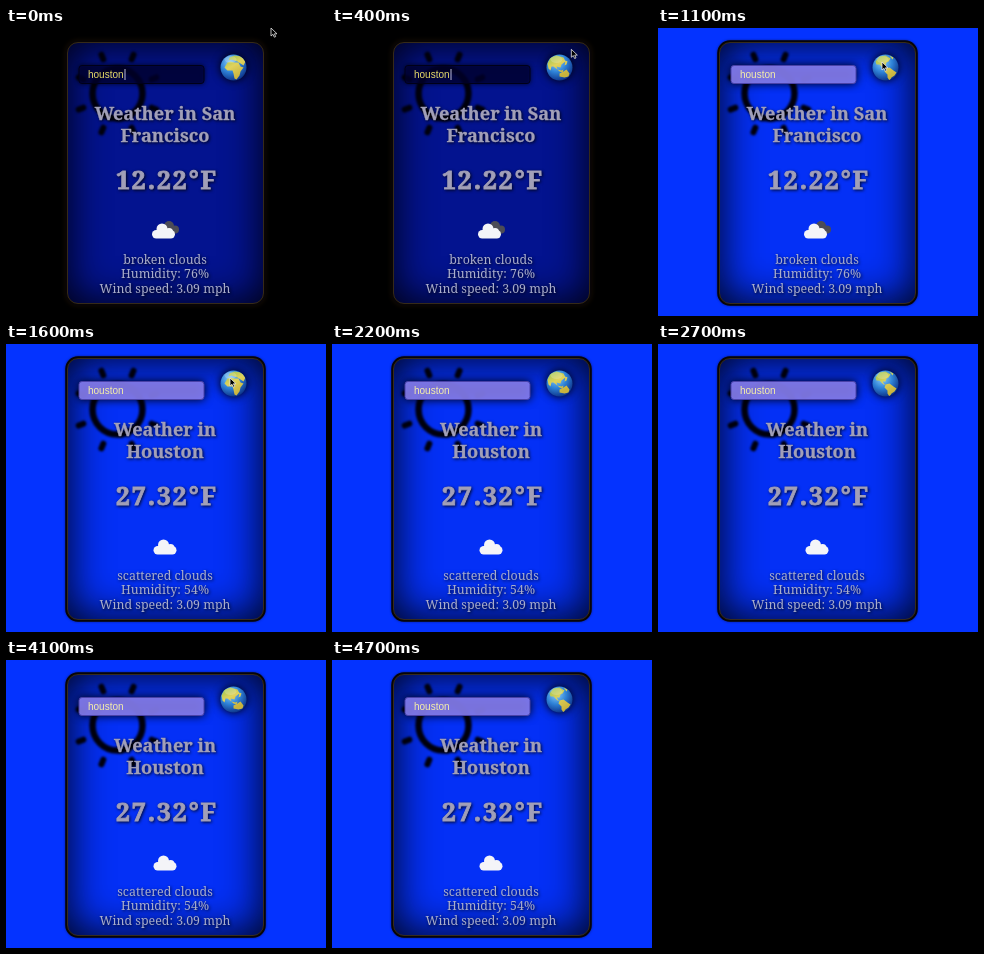
Animation, 320 px wide and 288 px high, one loop 4800 ms. Source, as an HTML page:

```html
<!DOCTYPE html>
<html lang="en">
<head>
<meta charset="utf-8">
<title>Weather card</title>
<style>
  html, body { margin: 0; width: 100%; height: 100%; overflow: hidden; background: #000; }
  body.lit { background: #0433ff; }
  .card {
    position: absolute; left: 61px; top: 14px; width: 197px; height: 262px;
    border-radius: 11px; background: #03138f;
    box-shadow: inset 0 0 38px 2px #000010, 0 0 5px 2px #150d04;
  }
  .lit .card { background: #0430f6; box-shadow: inset 0 0 40px 2px #000418, 0 0 3px 1px #0a0610; }
  svg { position: absolute; left: 0; top: 0; }
  .sun { stroke: #00000c; fill: none; filter: blur(1px); }
  .field { fill: #00003c; fill-opacity: .55; stroke: #000018; filter: drop-shadow(0 0 2px #000); }
  .lit .field { fill: #8a82f8; fill-opacity: .88; stroke: #4a42a8; filter: drop-shadow(0 0 4px #000); }
  .query { font: 10px "Liberation Sans", Arial, sans-serif; fill: #e8dc68; }
  .lit .query { fill: #f6f0a8; }
  .info { font-family: "Noto Serif", serif; text-anchor: middle; filter: drop-shadow(1px 1px 1.5px #000c); }
  .bold { font-weight: 700; fill: #a19fb8; stroke: #a19fb8; }
  .head { font-size: 18.2px; stroke-width: .3; }
  .temp { font-size: 25px; letter-spacing: 1.9px; stroke-width: .8; }
  .note { font-size: 12.4px; fill: #a9adcb; }
  .globe { filter: drop-shadow(0 0 4px #000); }
</style>
</head>
<body>
<div class="card"></div>
<svg width="320" height="288" viewBox="0 0 320 288">
  <defs>
    <radialGradient id="sea" cx=".38" cy=".3" r=".75">
      <stop offset="0" stop-color="#8fd0fa"/>
      <stop offset=".5" stop-color="#2f83d8"/>
      <stop offset="1" stop-color="#0b2f86"/>
    </radialGradient>
    <linearGradient id="land" x2=".5" y2="1">
      <stop offset="0" stop-color="#8fc24e"/>
      <stop offset=".5" stop-color="#e0d25c"/>
      <stop offset="1" stop-color="#c9b23c"/>
    </linearGradient>
    <clipPath id="disc"><circle r="13"/></clipPath>
  </defs>

  <rect x="60.5" y="13.5" width="198" height="263" rx="11.5" fill="none" stroke="#080506" stroke-width="2.5"/>
  <rect x="61.5" y="14.5" width="196" height="261" rx="10.5" fill="none" stroke="#58431c" stroke-width=".8" opacity=".75"/>

  <g class="sun" transform="translate(111.5 65.5)">
    <circle r="25" stroke-width="6.5"/>
    <g id="rays" stroke-width="6" stroke-linecap="round"></g>
  </g>

  <rect class="field" x="73" y="37.5" width="125" height="18" rx="3"/>
  <text class="query" x="82" y="50">houston</text>
  <path id="caret" d="M119 41v11" stroke="#b9b9d8"/>

  <g class="globe" transform="translate(227.5 39.5)">
    <circle r="13" fill="url(#sea)"/>
    <g clip-path="url(#disc)" fill="url(#land)">
      <path class="side" d="M-6-5L-3-6 1-5 5-5 7-1 10 0 7 4 6 8 3 12 1 11 0 6-1 3-6 3-9 0ZM-5-7L-4-10 1-12 8-11 12-6 10-2 7-4 4-6 1-7-2-8Z"/>
      <path class="side" d="M-12-4L-9-10-3-12 4-10 6-6 2-3 1 0-3-1-2 2-6-1-8-1-9 3-11 1ZM0 6L4 4 7 2 10 6 9 9 5 10 0 9ZM-2 2L2 3 4 2 3 5 0 4ZM6-7L8-6 7-3 5-2Z"/>
      <path class="side" d="M-10-6L-6-11 0-12 5-9 3-6 1-5 0-2-3-2-1 1 1 2-2 1-6-3-9-3ZM0 1L4 0 8 3 11 5 9 8 6 10 4 13 2 10 2 7-1 4ZM4-12L8-10 7-8Z"/>
    </g>
    <ellipse cx="-3" cy="-8" rx="6" ry="3.5" fill="#fff" opacity=".2"/>
  </g>

  <g class="info">
    <g class="bold head">
      <text x="159" y="92" data-key="0"></text>
      <text x="159" y="114" data-key="1"></text>
    </g>
    <text class="bold temp" x="161" y="161" data-key="2"></text>
    <g class="note">
      <text x="159" y="235.5" data-key="3"></text>
      <text x="159" y="250" data-key="4"></text>
      <text x="159" y="264.5">Wind speed: 3.09 mph</text>
    </g>
  </g>

  <g id="back" fill="#4c4c56">
    <circle cx="163" cy="198" r="5"/><circle cx="169" cy="201.5" r="4"/>
    <rect x="158" y="198" width="14" height="7.5" rx="3.5"/>
  </g>
  <g id="cloud" fill="#f4f4f8">
    <circle cx="156" cy="201" r="5.5"/><circle cx="163" cy="204" r="4"/>
    <rect x="146" y="202" width="23" height="8.5" rx="4.2"/>
  </g>

  <path id="cursor" d="M0 0V8L2 6.3 3.3 9.2 4.7 8.6 3.4 5.8H6Z" fill="#000" stroke="#e8e8e8" stroke-width=".8"/>
</svg>
<script>
const LOOP = 4800, LIT = 1100, LOADED = 1300;
const TURN = 600, TURN_SHIFT = 400;
const cities = [
  ["Weather in San", "Francisco", "12.22°F", "broken clouds", "Humidity: 76%"],
  ["Weather in", "Houston", "27.32°F", "scattered clouds", "Humidity: 54%"]
];
const $ = id => document.getElementById(id);
const lines = document.querySelectorAll("[data-key]");
const sides = document.querySelectorAll(".side");
const show = (el, on) => el.setAttribute("visibility", on ? "visible" : "hidden");
const part = (t, a, b) => Math.min(1, Math.max(0, (t - a) / (b - a)));
const ease = p => p * p * (3 - 2 * p);

$("rays").innerHTML = Array.from({ length: 8 }, (_, i) =>
  `<path d="M37 0H42" transform="rotate(${22.5 + i * 45})"/>`).join("");

function draw(t) {
  const lit = t >= LIT, loaded = t >= LOADED;
  document.body.classList.toggle("lit", lit);
  lines.forEach(el => el.textContent = cities[+loaded][el.dataset.key]);
  show($("back"), !loaded);
  $("cloud").setAttribute("transform", `translate(${loaded ? 1.5 : 0} 0)`);
  show($("caret"), !lit && t % 1000 < 500);

  const side = Math.floor((t + TURN_SHIFT) / TURN) % 3;
  sides.forEach((el, i) => show(el, i === side));

  // The pointer comes to the globe, clicks, then leaves to the right.
  const come = ease(part(t, 50, 650)), leave = ease(part(t, 1850, 2150));
  const x = 265 - 41 * come + 100 * leave, y = 34 * come + 18 * leave;
  $("cursor").setAttribute("transform", `translate(${x} ${y})`);
}

function tick() {
  draw(performance.now() % LOOP);
  requestAnimationFrame(tick);
}
tick();
</script>
</body>
</html>
```
